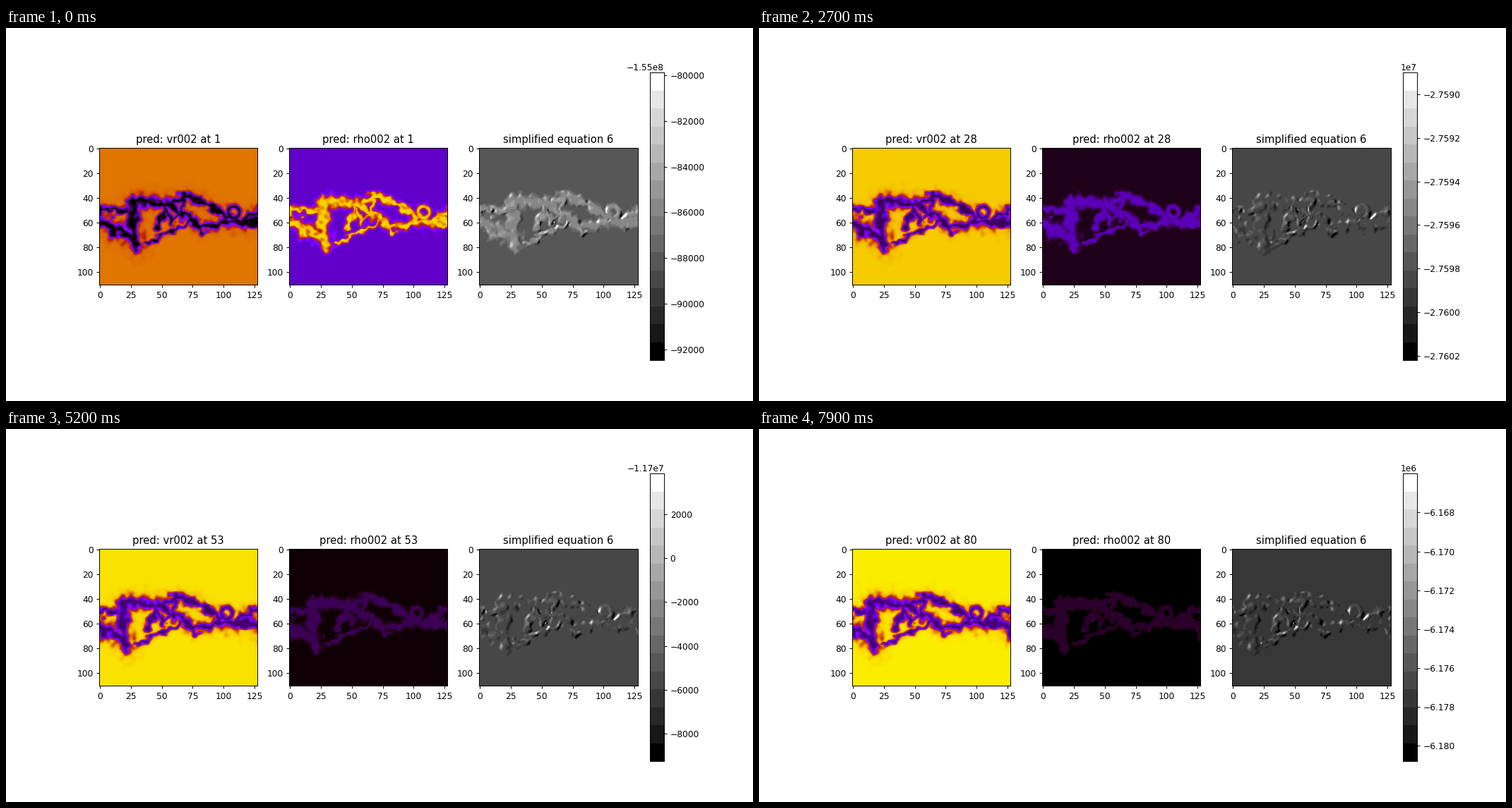
Write a matplotlib script that moves like this. It is 1058 px wide and 529 px high and loops after 8000 ms.

```python
import numpy as np
import matplotlib.pyplot as plt
from matplotlib.animation import FuncAnimation
from matplotlib.colors import ListedColormap

W, H = 1058, 529
STEPS, INTERVAL = 80, 100
NX, NY, FINE = 128, 111, 4
rng = np.random.default_rng(11)

# Filaments: width, then x, y pairs in grid cells
FILAMENTS = [
    (5.2, -4, 58, 14, 65, 29, 75),
    (3.6, 7, 64, 12, 71),
    (3.0, -2, 50, 23, 51),
    (5.0, 28, 43, 26, 62, 30, 79),
    (4.6, 28, 43, 55, 45),
    (3.4, 55, 45, 70, 39, 84, 44, 103, 55),
    (3.7, 55, 45, 66, 53, 82, 64, 106, 60, 128, 59),
    (1.6, 38, 78, 52, 69, 72, 60),
    (2.6, 50, 44, 51, 54, 46, 65),
    (2.0, 53, 50, 58, 61, 64, 55),
    (2.2, 68, 54, 67, 42),
    (2.6, 89, 48, 104, 58),
    (3.0, 116, 57, 128, 52),
    (3.4, 110, 62, 126, 62),
    (2.2, 82, 64, 83, 70),
]

# Key values of the third panel and its scale
KEYS = np.array([0, 8, 20, 34, 52, 68, 79])
EQ_BACK = [5.5, 5.5, 3.6, 4.5, 4.4, 4.5, 3.5]
BAR_TOP = [1.55079892e8, 7.8428e7, 3.81752e7, 2.08598e7, 1.1696173e7,
           7.8159e6, 6.16601e6]
BAR_SPAN = [12580, 14430, 13470, 12880, 13055, 11840, 14770]


def at(step, values):
    return np.interp(np.log(step + 20), np.log(KEYS + 20), values)


def fade(step, power):
    return (20 / (step + 20)) ** power


x, y = np.meshgrid(np.arange(NX * FINE) / FINE, np.arange(NY))


def noise(low, high, waves=40):
    """Smooth noise, periodic in x, with waves in a frequency band."""
    total = np.zeros_like(x)
    for _ in range(waves):
        size, angle = rng.uniform(low, high), rng.uniform(0, np.pi)
        kx, ky = round(size * np.cos(angle)), size * np.sin(angle)
        total += np.cos(2 * np.pi * (kx * x + ky * y) / NX
                        + rng.uniform(0, 2 * np.pi))
    return total / np.sqrt(waves / 2)


def segment_distance(px, py, x0, y0, x1, y1):
    dx, dy = x1 - x0, y1 - y0
    mid = (x0 + x1) / 2
    rx = (px - mid + NX / 2) % NX - NX / 2 + mid - x0
    ry = py - y0
    t = np.clip((rx * dx + ry * dy) / (dx * dx + dy * dy), 0, 1)
    return np.hypot(rx - t * dx, ry - t * dy)


def build_cloud():
    px = x + 1.1 * noise(6, 15) + .4 * noise(16, 28)
    py = y + 1.0 * noise(6, 16) + .5 * noise(16, 30)
    # Ring on the right, then the strokes
    u = np.abs(np.hypot(x - 108, y - 52) - 4.6) / 2
    for width, *flat in FILAMENTS:
        points = np.reshape(flat, (-1, 2))
        for a, b in zip(points, points[1:]):
            u = np.minimum(u, segment_distance(px, py, *a, *b) / width)
    u *= 1 + .1 * noise(8, 20)
    return .88 * np.exp(-np.abs(u) ** 3) + .12 * np.exp(-(u / 1.7) ** 2)


def build_relief(cloud):
    gx = np.gradient(cloud, axis=1) * FINE
    gy = np.gradient(cloud, axis=0)
    slope = (gx + .5 * gy) * (.65 + .5 * noise(8, 18))
    streaks = cloud * noise(9, 17) * .07
    relief = slope + streaks
    relief /= np.percentile(np.abs(relief), 99.6)
    return np.sign(relief) * np.abs(relief) ** 1.35


cloud = build_cloud()
relief = build_relief(cloud)
density = np.clip(cloud ** 1.5 * (1 - .1 * noise(12, 26)), 0, 1)
columns = np.arange(NX)


def drift(field, step):
    """Slide the field to the left, a little faster near the front."""
    speed = .13 * (1 + .2 * np.cos(2 * np.pi * (columns - 25) / NX))
    pos = (columns + speed * step) * FINE
    i = np.floor(pos).astype(int)
    f = pos - i
    n = NX * FINE
    return field[:, i % n] * (1 - f) + field[:, (i + 1) % n] * f


def vr_field(step):
    back = 1 - .228 * fade(step, 1.37)
    core = .085 * (1 - fade(step, 1.2))
    return back - (back - core) * drift(cloud, step)


def rho_field(step):
    back, peak = .145 * fade(step, 2.4), .95 * fade(step, 2.2)
    root = np.sqrt(back + (peak - back) * drift(density, step))
    # Shades get coarser as the panel darkens
    q = (3 + 25 * step / (STEPS - 1)) / 255
    base = np.sqrt(back)
    return (base + np.round((root - base) / q) * q) ** 2


def eq_field(step):
    lift = .2 * fade(step, 2.2)
    value = at(step, EQ_BACK) / 16 + lift * drift(cloud, step)
    edge = drift(relief, step)
    return np.clip(value + np.where(edge > 0, .55, .33) * edge, 0, 1)


levels = (np.arange(16) + .5) / 16
levels[[0, -1]] = 0, 1
grays = ListedColormap([(v, v, v) for v in levels])

fig = plt.figure(figsize=(12, 6), dpi=88.1666667, facecolor="white")


def add_axes(left, top, width, height):
    return fig.add_axes([left / W, 1 - (top + height) / H,
                         width / W, height / H])


SIDE = 224.2
panels = []
for col, (field, cmap) in enumerate([(vr_field, "gnuplot"),
                                     (rho_field, "gnuplot"),
                                     (eq_field, grays)]):
    ax = add_axes(132.25 + 1.2 * SIDE * col, 169.9, SIDE, SIDE * NY / NX)
    image = ax.imshow(field(0), cmap=cmap, vmin=0, vmax=1, aspect="auto")
    ax.set_xticks(range(0, 126, 25))
    ax.set_yticks(range(0, 101, 20))
    panels.append((ax, image, field))
panels[2][0].set_title("simplified equation 6")

bar = add_axes(911.7, 63.5, 20.4, 407.3)
bar.imshow(np.arange(16)[:, None], cmap=grays, origin="lower", aspect="auto",
           extent=(0, 1, 0, 1), transform=bar.transAxes,
           interpolation="nearest")
bar.set_xticks([])
bar.yaxis.tick_right()
bar.yaxis.set_offset_position("right")


def update(step):
    for ax, image, field in panels:
        image.set_data(field(step))
    panels[0][0].set_title(f"pred: vr002 at {step + 1}")
    panels[1][0].set_title(f"pred: rho002 at {step + 1}")
    top = -np.exp(at(step, np.log(BAR_TOP)))
    bar.set_ylim(top - at(step, BAR_SPAN), top)
    return []


anim = FuncAnimation(fig, update, frames=STEPS, interval=INTERVAL,
                     init_func=lambda: update(0), repeat=True)
plt.show()
```
